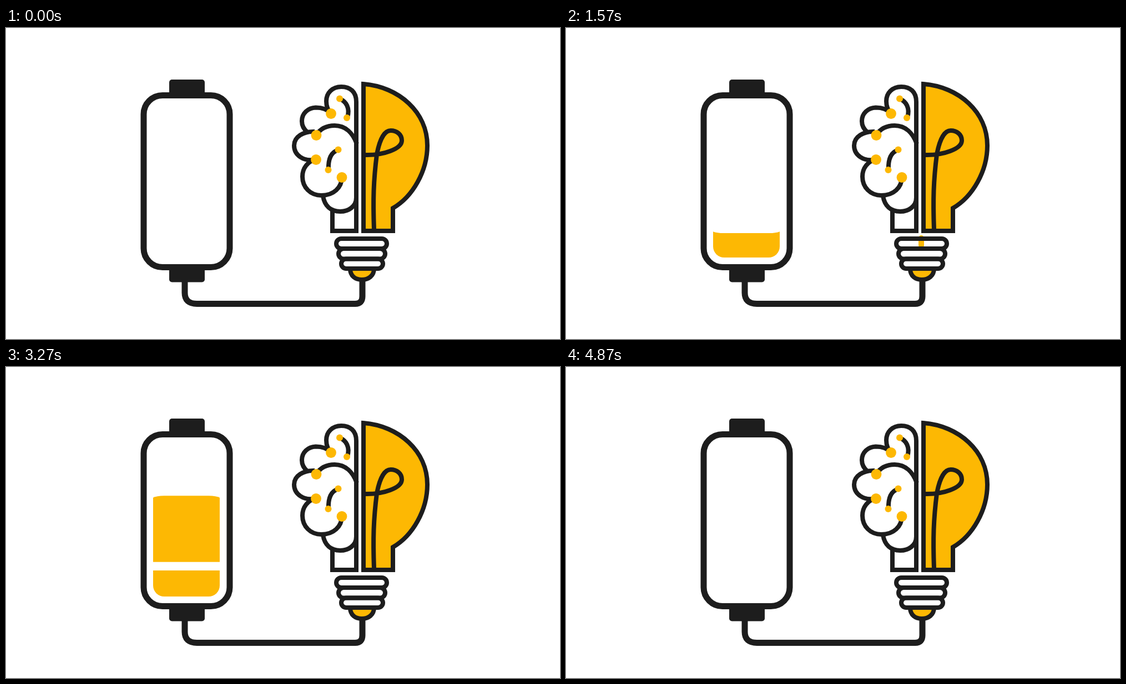
An HTML page with a canvas that plays this animation: 998 by 561 pixels, repeating every 5.01 s.

```html
<!DOCTYPE html>
<html lang="en">
<head>
<meta charset="utf-8">
<title>Idea charging</title>
<style>
html, body { margin: 0; width: 100%; height: 100%; overflow: hidden; background: #fff; }
canvas { display: block; }
</style>
</head>
<body>
<canvas id="stage" width="998" height="561"></canvas>
<script>
const ctx = document.getElementById('stage').getContext('2d');
const INK = '#1d1d1d', GOLD = '#fdb803', WHITE = '#fff';
const LOOP = 5010, STEP = 1000 / 30;
const FIRST = 6, LAST = 146, CHARGE = 35, PULSE = 22;

const bulb = 'M644 101C708 106 759 152 759 212C759 258 733 304 697 325V366H644Z';
const filament = 'M646 229C680 230 713 218 713 203C713 192 704 185 693 185C678 185 671 212 668 228C662 275 661 310 663 364';
const cable = 'M322 455V477.5Q322 497.5 344 497.5H629Q642 497.5 642 484V455';
const tip = 'M620 434C620 448 630 454 641 454C653 454 663 447 663 434Z';
const brain = [
  'M588 329V366H631V133C631 115 620 106 604 106C588 106 577 117 577 132C577 141 580 149 586 154',
  'M586 154C578 146 568 143.5 558 143.5C544 144 533 154 533 168C533 176 537 183 543 188',
  'M556 187C536 186 519 196 519 212C519 229 536 242 558 237',
  'M558 237C543 241 534 253 534 268C534 288 549 302 568 302C590 302 605 288 605 269',
  'M559 193C566 182 578 176 592 176C612 176 625 190 632 209',
  'M571 303C574 321 585 331 602 331C617 331 631 322 631 306',
  'M601 128C613 132 620 145 615 161',
  'M598 220C586 224 580 236 581 256'
];
const bigDots = [[585.5, 154.5], [559, 193.5], [558.5, 237.5], [605, 269.5]];
const smallDots = [[601, 127.5], [614, 162], [598.5, 219.5], [580.5, 256]];
const rings = [[595, 380, 91, 18], [599, 398, 84, 18.5], [604, 416.5, 75, 17.5]];

// Pulse ends along the bulb axis: [step, y]
const pulseTail = [[3, 249], [8, 260], [15, 328], [17, 350], [18, 374], [21, 406]];
const pulseHead = [[3, 249], [8, 300], [15, 366], [17, 382], [18, 397], [20, 406], [21, 406]];

function along(keys, u) {
  const i = keys.findIndex(k => k[0] >= u);
  if (i < 1) return keys[0][1];
  const [u0, y0] = keys[i - 1], [u1, y1] = keys[i];
  return y0 + (y1 - y0) * (u - u0) / (u1 - u0);
}

function line(d, width = 8, fill) {
  const path = new Path2D(d);
  if (fill) {
    ctx.fillStyle = fill;
    ctx.fill(path);
  }
  ctx.strokeStyle = INK;
  ctx.lineWidth = width;
  ctx.stroke(path);
}

function box(x, y, w, h, r) {
  ctx.beginPath();
  ctx.roundRect(x, y, w, h, r);
}

function dots(list, r) {
  ctx.fillStyle = GOLD;
  for (const [x, y] of list) {
    ctx.beginPath();
    ctx.arc(x, y, r, 0, Math.PI * 2);
    ctx.fill();
  }
}

function drawPulse(u) {
  if (u < 4 || u > 20) return;
  const top = along(pulseTail, u), bottom = along(pulseHead, u);
  ctx.fillStyle = GOLD;
  box(635, top, 10, bottom - top, 5);
  ctx.fill();
}

function drawCharge(c) {
  const y = 421.6 - 8.61 * c, bend = (c - 13) * 0.4;
  ctx.save();
  box(265, 137, 120, 277, 20);
  ctx.clip();
  ctx.fillStyle = GOLD;
  ctx.beginPath();
  ctx.moveTo(265, 420);
  ctx.lineTo(265, y + bend);
  ctx.quadraticCurveTo(271, y, 285, y);
  ctx.lineTo(365, y);
  ctx.quadraticCurveTo(379, y, 385, y + bend);
  ctx.lineTo(385, 420);
  if (y < 416) ctx.fill();
  ctx.restore();
  ctx.fillStyle = WHITE;
  ctx.fillRect(262, 351.7, 126, 15.3);
}

function drawBattery(c) {
  ctx.fillStyle = INK;
  box(294, 93, 64, 30, 5);
  ctx.fill();
  box(294, 430, 64, 28.5, 5);
  ctx.fill();
  ctx.strokeStyle = INK;
  ctx.lineWidth = 11;
  box(248, 121.5, 155, 310, 34);
  ctx.stroke();
  drawCharge(c);
}

function drawBulb() {
  line(tip, 8, GOLD);
  ctx.lineWidth = 8;
  for (const [x, y, w, h] of rings) {
    box(x, y, w, h, h / 2);
    ctx.stroke();
  }
  line(bulb, 8, GOLD);
  line(filament);
  brain.forEach(d => line(d));
  dots(bigDots, 9.4);
  dots(smallDots, 6);
}

function draw(ms) {
  let n = Math.floor((ms % LOOP + 3.4) / STEP);
  n = n < LAST ? Math.max(n, FIRST) : FIRST;
  ctx.fillStyle = WHITE;
  ctx.fillRect(0, 0, 998, 561);
  drawPulse((n - FIRST - 1) % PULSE);
  line(cable, 11);
  drawBattery((n - FIRST) % CHARGE);
  drawBulb();
}

const start = performance.now();
function tick() {
  draw(performance.now() - start);
  requestAnimationFrame(tick);
}
tick();
</script>
</body>
</html>
```
